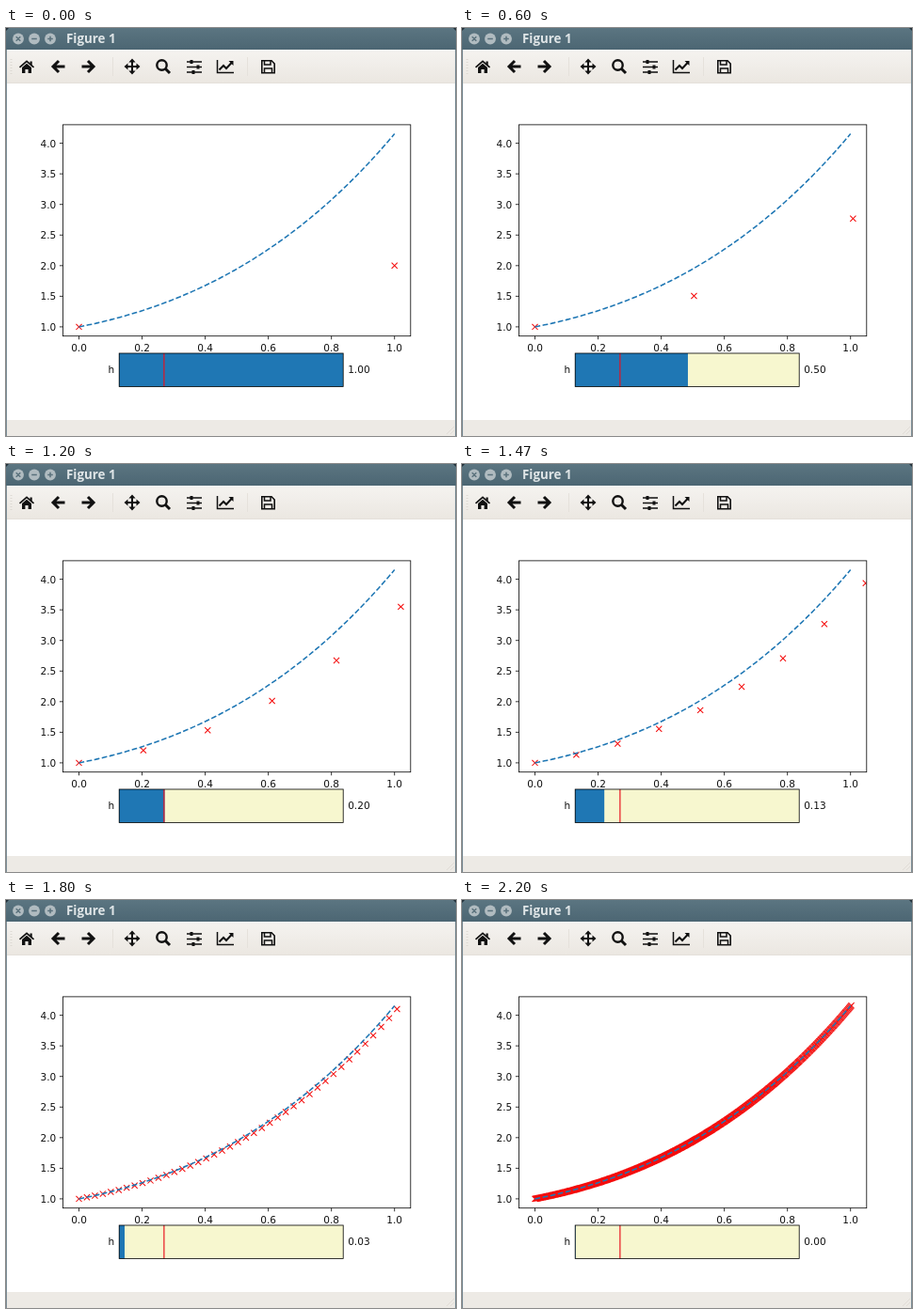
Animation of 478x434 px, one loop 2.39 s. Source, as an HTML page:

```html
<!DOCTYPE html>
<html lang="en">
<head>
<meta charset="utf-8">
<title>Figure 1</title>
<style>
  html, body { margin: 0; width: 100%; height: 100%; overflow: hidden; background: #fff; }
  svg { display: block; width: 478px; height: 434px; }
  .plot text { font: 10.5px "DejaVu Sans", sans-serif; fill: #111; }
  .title { font: bold 13.4px "Open Sans", "Noto Sans", sans-serif; fill: #dfe5e7; }
  .frame { fill: none; stroke: #000; stroke-width: .8; }
  .icon { fill: none; stroke: #111; stroke-width: 2; }
  .solid { fill: #111; stroke: none; }
</style>
</head>
<body>
<svg viewBox="0 0 478 434">
  <defs>
    <linearGradient id="bar" x2="0" y2="1">
      <stop offset="0" stop-color="#5b7581"/><stop offset="1" stop-color="#4c6673"/>
    </linearGradient>
    <linearGradient id="tools" x2="0" y2="1">
      <stop offset="0" stop-color="#f5f3f0"/><stop offset="1" stop-color="#ebe7e1"/>
    </linearGradient>
    <clipPath id="axes"><rect x="60.5" y="102.9" width="369" height="224.8"/></clipPath>
  </defs>

  <!-- window -->
  <rect width="478" height="434" fill="#fff"/>
  <rect y="23" width="478" height="35.5" fill="url(#tools)"/>
  <path d="M0 58.5H478" stroke="#e4e0da"/>
  <rect y="417" width="478" height="17" fill="#edeae5"/>
  <path d="M468 432L476 424M472 432L476 428" stroke="#e0dcd6"/>
  <rect width="478" height="23" fill="url(#bar)"/>
  <path d="M.5 23V434M477.5 23V434" stroke="#7b8d96"/>
  <path d="M0 0H3L0 3ZM478 0H475L478 3Z" fill="#22303a"/>
  <g fill="#b0bbc0">
    <circle cx="13" cy="11.5" r="5.9"/><circle cx="30" cy="11.5" r="5.9"/><circle cx="47" cy="11.5" r="5.9"/>
  </g>
  <path d="M10.7 9.2l4.6 4.6m0-4.6l-4.6 4.6M27.2 11.5h5.6M44.2 11.5h5.6m-2.8-2.8v5.6" stroke="#5a717c" stroke-width="1.5"/>
  <text class="title" x="64" y="16.4">Figure 1</text>

  <!-- toolbar -->
  <path d="M5.5 33V50" stroke="#ddd9d3" stroke-width="2" stroke-dasharray="1 2"/>
  <path d="M113.5 31V51M256.5 31V51" stroke="#e5e1db"/>
  <g class="icon">
    <path d="M14.5 41.8L22 35.3L29.5 41.8" stroke-width="1.7"/>
    <path class="solid" d="M17 42L22 37.7L27 42V48H23.6V44H20.4V48H17ZM25.5 35.5H27.7V40L25.5 38Z"/>
    <path d="M62.5 41H50.5M56 35L50 41L56 47" stroke-width="3"/>
    <path d="M80.5 41H92.5M87 35L93 41L87 47" stroke-width="3"/>
    <path d="M128 41H140M134 35V47"/>
    <path class="solid" d="M134 32.5l3.6 4h-7.2ZM134 49.5l3.6-4h-7.2ZM125.5 41l4-3.6v7.2ZM142.5 41l-4-3.6v7.2Z"/>
    <circle cx="165.5" cy="39.5" r="5.2" stroke-width="2.4"/>
    <path d="M169.5 43.5L174 48" stroke-width="3"/>
    <path d="M192 36H208M192 41.5H208M192 47H208" stroke-width="1.5"/>
    <path d="M197 34v4M204 39.5v4M199 45v4" stroke-width="3"/>
    <path d="M224.5 34V47.5H242" stroke-width="1.5"/>
    <path d="M226.5 44.5L231 40L234 43L240 36.5"/>
    <path class="solid" d="M236.5 35H241.5V40Z"/>
    <path d="M271.8 34.8H282L285.2 38V47.7H271.8Z" stroke-width="1.6"/>
    <path d="M274.5 35V39H281V35M274.5 47.5V43H282.5V47.5" stroke-width="1.5"/>
  </g>

  <!-- figure -->
  <g class="plot">
    <g id="ticks"></g>
    <g clip-path="url(#axes)" fill="none">
      <path id="marks" stroke="#f40c0c" stroke-width="1.04"/>
      <path id="exact" stroke="#1f77b4" stroke-width="1.56" stroke-dasharray="5.77 2.5"/>
    </g>
    <rect class="frame" x="60.5" y="102.9" width="369.3" height="224.8"/>
    <rect x="120.2" y="346" width="238" height="35.4" fill="#f7f7cf"/>
    <rect id="fill" x="120" y="346" height="35.4" fill="#1f77b4"/>
    <path d="M167.8 346V381.4" stroke="#e8101c" stroke-width="1.7" opacity=".7"/>
    <rect class="frame" x="120.2" y="346" width="238" height="35.4"/>
    <text x="115.2" y="367.2" text-anchor="end">h</text>
    <text id="value" x="363.2" y="367.2"></text>
  </g>
</svg>
<script>
const LOOP = 2390;
// [start ms, step size h]
const STEPS = [
  [0, 1], [70, .94], [130, .87], [200, .8], [270, .73], [330, .66], [400, .6],
  [600, .504], [670, .46], [800, .4], [1000, .294],
  [1200, .204], [1270, .186], [1330, .168], [1400, .149], [1470, .131],
  [1530, .108], [1600, .078], [1670, .0478], [1800, .0252], [2000, .0135], [2200, .0025]
];
const ARM = 3.1;
const el = id => document.getElementById(id);
const px = t => 77.5 + 335.2 * t;
const py = y => 317.9 - 65.1 * (y - 1);

function drawAxes() {
  let out = '';
  for (let i = 0; i <= 5; i++) {
    const x = px(i / 5);
    out += `<path class="frame" d="M${x} 327.7v3.6"/>` +
      `<text x="${x}" y="343.5" text-anchor="middle">${(i / 5).toFixed(1)}</text>`;
  }
  for (let v = 1; v <= 4; v += .5) {
    const y = py(v);
    out += `<path class="frame" d="M60.5 ${y}h-3.6"/>` +
      `<text x="53.3" y="${y + 3.9}" text-anchor="end">${v.toFixed(1)}</text>`;
  }
  el('ticks').innerHTML = out;

  const points = Array.from({ length: 101 }, (_, i) => {
    const t = i / 100;
    return `${px(t)} ${py(3 * Math.exp(t) - 2 * t - 2)}`;
  });
  el('exact').setAttribute('d', 'M' + points.join('L'));
}

const cross = (x, y) =>
  `M${x - ARM} ${y - ARM}l${2 * ARM} ${2 * ARM}m0 ${-2 * ARM}l${-2 * ARM} ${2 * ARM}`;

// Euler's method for y' = y + 2t, y(0) = 1
function eulerMarks(h) {
  let t = 0, y = 1, d = cross(px(t), py(y));
  while (t < 1) {
    y += h * (y + 2 * t);
    t += h;
    d += cross(px(t), py(y));
  }
  return d;
}

let shown;
function tick(now) {
  const time = now % LOOP;
  const h = STEPS.findLast(([start]) => start <= time)[1];
  if (h !== shown) {
    shown = h;
    el('marks').setAttribute('d', eulerMarks(h));
    el('fill').setAttribute('width', 238 * h);
    el('value').textContent = h.toFixed(2);
  }
  requestAnimationFrame(tick);
}

drawAxes();
tick(0);
</script>
</body>
</html>
```
